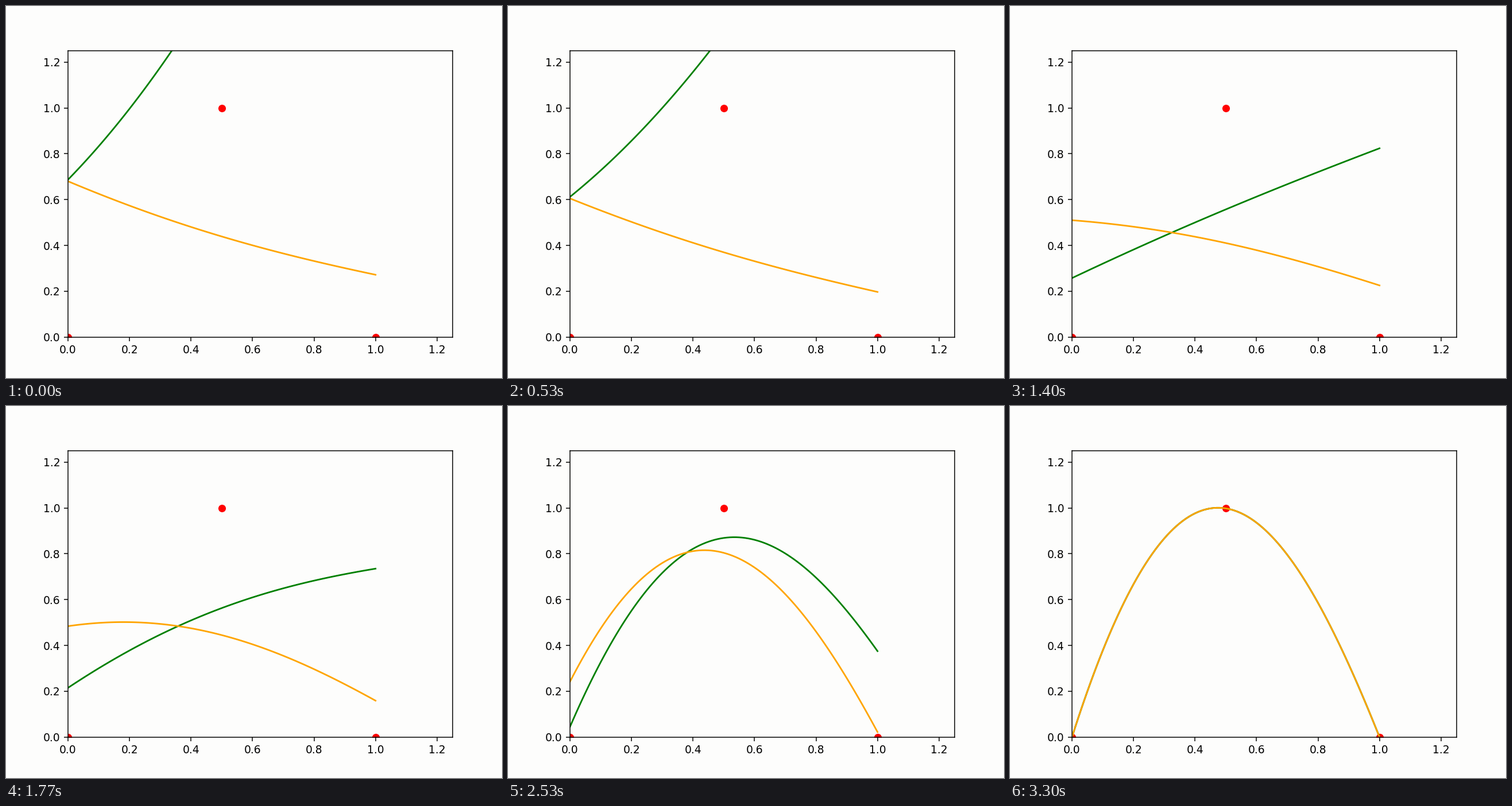
Write a matplotlib script that moves like this. It is 864 by 648 pixels and loops after 3.33 s.

```python
import numpy as np
import matplotlib.pyplot as plt
from matplotlib.animation import FuncAnimation

INTERVAL = 30
FRAMES = 111
STEP_MS = 33.3      # one training step
SKEW = 0.85         # how far a bent curve leans to the left
PAPER = "#fdfdfc"

# Key poses of the fit: height of a curve at x = 0, 0.5 and 1.
KEY_STEPS = np.array([0, 16, 31, 53, 76, 88, 99])
FITTED = (0, .998, 0)
POSES = {
    "green": [(.687, 1.592, 2.889), (.612, 1.328, 2.355), (.311, .555, .949),
              (.215, .563, .735), (.045, .869, .375), (.028, .918, .184),
              FITTED],
    "orange": [(.680, .439, .272), (.605, .370, .197), (.533, .390, .263),
               (.484, .445, .159), (.242, .804, .022), (.124, .886, .012),
               FITTED],
}


def key_speeds(poses):
    """Speed at each pose: harmonic mean of both sides, zero at a turn."""
    gaps = np.diff(KEY_STEPS)[:, None]
    rates = np.diff(poses, axis=0) / gaps
    before, after = rates[:-1], rates[1:]
    w1, w2 = 2 * gaps[1:] + gaps[:-1], gaps[1:] + 2 * gaps[:-1]
    turn = before * after <= 0
    inverse = w1 / np.where(turn, 1, before) + w2 / np.where(turn, 1, after)
    inner = np.where(turn, 0, (w1 + w2) / np.where(turn, 1, inverse))
    return np.vstack([rates[:1], inner, rates[-1:]])


def pose_at(poses, speeds, step):
    """Cubic Hermite motion between the poses around a step."""
    i = min(np.searchsorted(KEY_STEPS, step, side="right"),
            len(KEY_STEPS) - 1) - 1
    gap = KEY_STEPS[i + 1] - KEY_STEPS[i]
    t = (step - KEY_STEPS[i]) / gap
    ease = t * t * (3 - 2 * t)
    return (poses[i] + ease * (poses[i + 1] - poses[i])
            + gap * t * (1 - t) * ((1 - t) * speeds[i] - t * speeds[i + 1]))


def curve(pose):
    """Parabola through the three heights, leaning with its bend."""
    left, mid, right = pose
    bend = mid - (left + right) / 2
    arch = x * (1 - x)
    lean = SKEW * (0.25 - x * x)
    return left + (right - left) * x + bend * arch * (4 + lean)


x = np.linspace(0, 1, 101)

fig, ax = plt.subplots(figsize=(6.4, 4.8), dpi=135, facecolor=PAPER)
ax.set_facecolor(PAPER)
ax.set(xlim=(0, 1.25), ylim=(0, 1.25))
ax.scatter([0, .5, 1], [0, 1, 0], color="red")

fits = []
for color, poses in POSES.items():
    line, = ax.plot([], [], color=color)
    poses = np.array(poses)
    fits.append((line, poses, key_speeds(poses)))


def update(frame):
    # Show the step that is current late in this frame.
    step = (frame * INTERVAL + 25) // STEP_MS
    for line, poses, speeds in fits:
        line.set_data(x, curve(pose_at(poses, speeds, step)))
    return [line for line, _, _ in fits]


anim = FuncAnimation(fig, update, frames=FRAMES, interval=INTERVAL,
                     init_func=lambda: update(0), repeat=True, repeat_delay=0)
plt.show()
```
